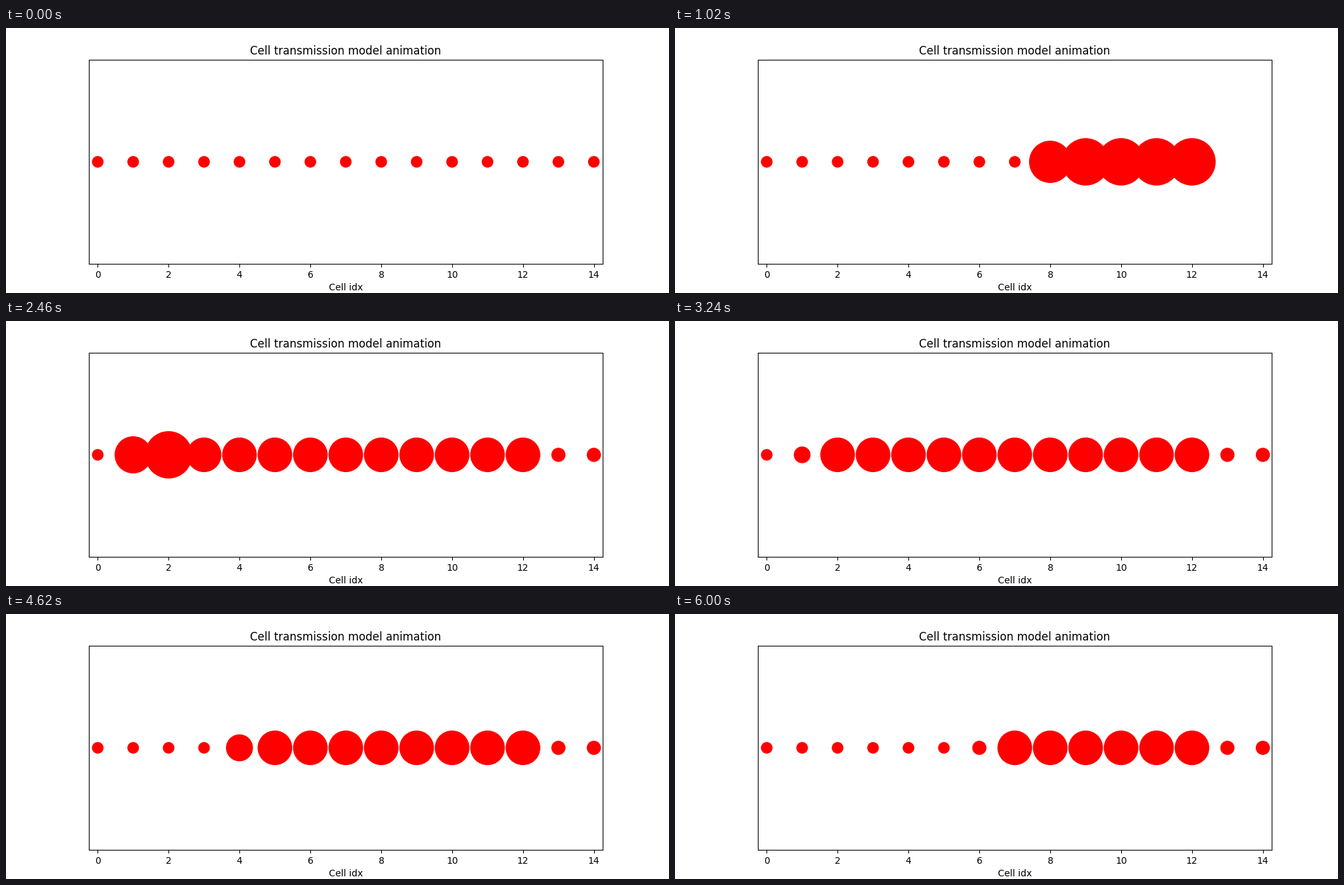
A matplotlib script for the animation above (6.06 s loop, 1000 by 400 pixels).

```python
import matplotlib.pyplot as plt
import numpy as np
from matplotlib.animation import FuncAnimation

CELLS = 15
STEPS = 101
INTERVAL = 60

JAM = 50.0            # most vehicles a cell can hold
INFLOW = 100 / 9      # demand entering cell 0 per step
CAPACITY = 125 / 9    # largest flow between two cells per step
BLOCKED_CELL = 12     # nothing leaves this cell while the road is closed
CLOSED_STEPS = 31
EDGE = 1.5


def advance(cells, closed):
    """Move vehicles one step along the road."""
    room = np.append(JAM - cells[1:], JAM)
    out = np.minimum(np.minimum(cells, CAPACITY), room)
    if closed:
        out[BLOCKED_CELL] = 0
    arriving = np.concatenate(([min(INFLOW, JAM - cells[0])], out[:-1]))
    moved = cells - out + arriving
    moved[moved < 1e-6] = 0
    return moved


def simulate():
    states = [np.full(CELLS, INFLOW)]
    for step in range(1, STEPS):
        states.append(advance(states[-1], step <= CLOSED_STEPS))
    return states


states = simulate()

fig, ax = plt.subplots(figsize=(10, 4), dpi=100)
ax.set_title("Cell transmission model animation")
ax.set_xlabel("Cell idx")
ax.set_xlim(-0.25, CELLS - 0.75)
ax.set_ylim(-1, 1)
ax.set_xticks(range(0, CELLS, 2))
ax.set_yticks([])
dots = ax.scatter(np.arange(CELLS), np.zeros(CELLS), s=states[0] ** 2,
                  c="red", linewidths=EDGE)


def draw(frame):
    cells = states[frame]
    dots.set_sizes(cells ** 2)
    dots.set_linewidths(np.where(cells > 0, EDGE, 0))  # hide empty cells
    return (dots,)


anim = FuncAnimation(fig, draw, frames=STEPS, interval=INTERVAL,
                     repeat=True, repeat_delay=0)
plt.show()
```
